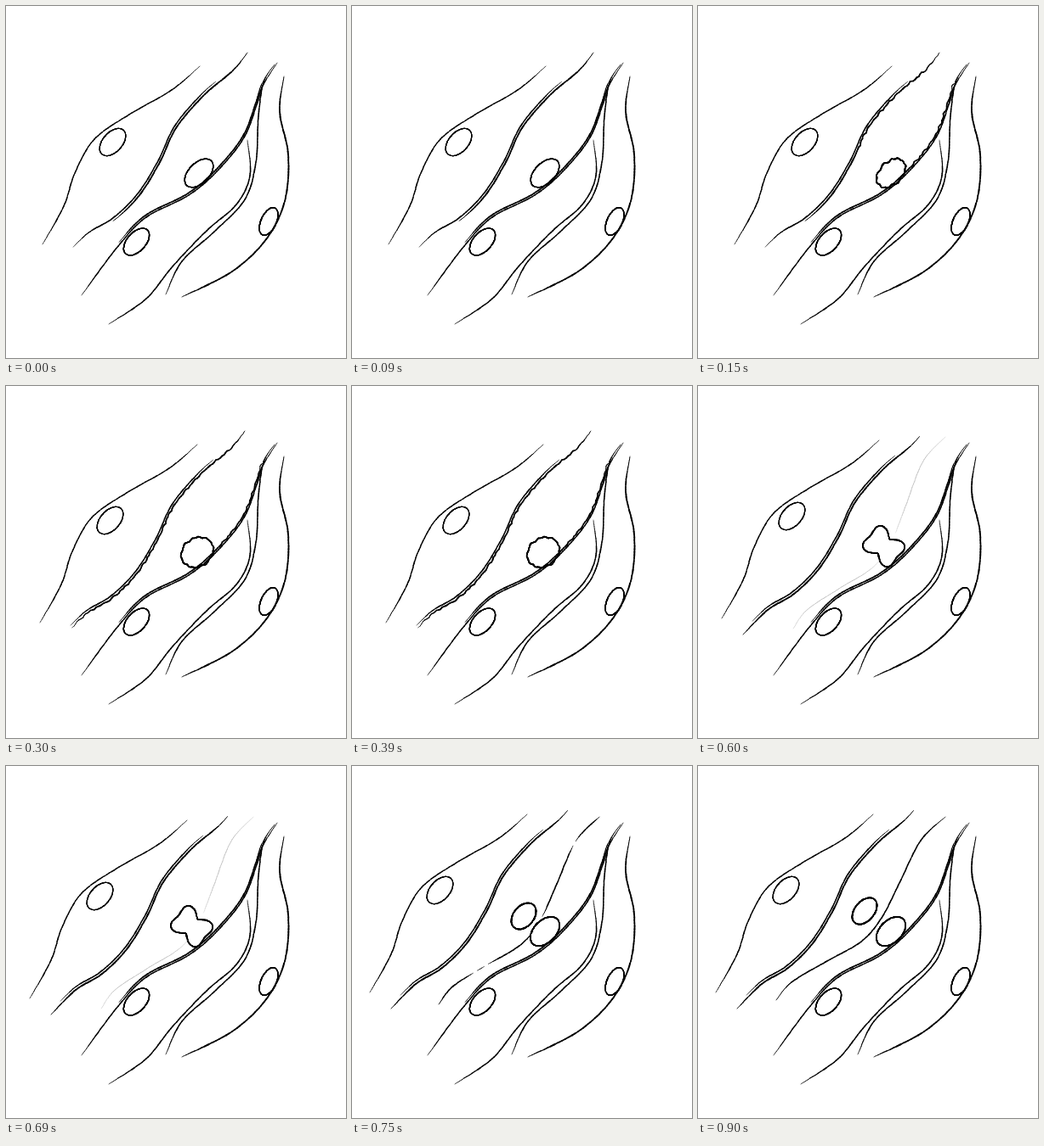
Animation of 400x415 px, one loop 1050 ms. Source, as an HTML page with a canvas:

```html
<!DOCTYPE html>
<html lang="en">
<head>
<meta charset="utf-8">
<title>Cell division</title>
<style>
  html, body { margin: 0; width: 100%; height: 100%; overflow: hidden; background: #fff; }
  canvas { display: block; }
</style>
</head>
<body>
<canvas id="stage" width="400" height="415"></canvas>
<script>
const STEP = 150;
const ctx = document.getElementById('stage').getContext('2d');
ctx.lineCap = 'round';

const { sin, cos, hypot, min, max, PI } = Math;
const grain = s => (sin(s * 1.13) + sin(s * 0.71 + 2) + sin(s * 0.29 + 4)) / 3;
const ripple = s => 0.7 * sin(s * 0.62 + 1.5 * sin(s * 0.13)) + 0.5 * sin(s * 0.37 + 1);
const shift = (points, dx, dy) => points.map(([x, y]) => [x + dx, y + dy]);
const path = text => text.split(' ').map(pair => pair.split(',').map(Number));

// Catmull-Rom curve through the points
function spline(points, closed) {
  const n = points.length, steps = 16, out = [];
  const at = i => points[closed ? (i + n) % n : max(0, min(n - 1, i))];
  const blend = (a, b, c, d, t) => {
    const cubic = 3 * (b - c) + d - a;
    const square = 2 * a - 5 * b + 4 * c - d;
    return b + 0.5 * t * (c - a + t * (square + t * cubic));
  };
  for (let i = 0; i < (closed ? n : n - 1); i++) {
    const [a, b, c, d] = [at(i - 1), at(i), at(i + 1), at(i + 2)];
    for (let k = 0; k < steps; k++) {
      out.push([0, 1].map(j => blend(a[j], b[j], c[j], d[j], k / steps)));
    }
  }
  out.push(at(closed ? 0 : n - 1));
  return out;
}

// Pencil stroke along the part from..to of a curve, thin at its ends.
// Above the height `below` its edge is ragged.
function brush(points, { width = 1.5, from = 0, to = 1, rough = 0, below = 415, closed = false, taper = 35, color = '#000' } = {}) {
  const line = spline(points, closed), last = line.length - 1;
  const length = [0];
  for (let i = 1; i <= last; i++) {
    length.push(length[i - 1] + hypot(line[i][0] - line[i - 1][0], line[i][1] - line[i - 1][1]));
  }
  const total = length[last], start = from * total, end = to * total;
  const edge = line.map(([x, y], i) => {
    const [x0, y0] = line[max(0, i - 1)], [x1, y1] = line[min(last, i + 1)];
    const size = hypot(x1 - x0, y1 - y0) || 1;
    const fade = min(1, length[i] / 5, (total - length[i]) / 5);
    const push = fade * ((y < below ? rough : 0) * ripple(length[i]) + 0.2 * grain(length[i] * 1.7));
    return [x - (y1 - y0) / size * push, y + (x1 - x0) / size * push];
  });
  ctx.strokeStyle = color;
  for (let i = 1; i <= last; i++) {
    const s = length[i];
    if (s < start || s > end) continue;
    const ends = closed ? 1 : min(1, (s - start) / taper, (end - s) / taper);
    ctx.lineWidth = width * (0.4 + 0.6 * ends) * (1 + 0.18 * grain(s));
    ctx.beginPath();
    ctx.moveTo(...edge[i - 1]);
    ctx.lineTo(...edge[i]);
    ctx.stroke();
  }
}

// Closed outline given by its radius at each angle from a tilted axis
function blob(x, y, tilt, radius, options) {
  const points = Array.from({ length: 24 }, (_, k) => {
    const angle = k * PI / 12, turned = angle + tilt * PI / 180, r = radius(angle);
    return [x + r * cos(turned), y + r * sin(turned)];
  });
  brush(points, { closed: true, width: 1.7, ...options });
}
const oval = (x, y, rx, ry, tilt, options) =>
  blob(x, y, tilt, a => rx * ry / hypot(ry * cos(a), rx * sin(a)), options);

const leftWall = path('43,281 68,236 81,197 104,157 145,128 195,99 228,71');
const upperWall = path('68,300 97,271 128,252 157,223 181,184 200,144 232,106 267,76 284,55');
const lowerWall = path('89,341 132,283 165,249 215,223 250,193 280,155 295,116 302,94 319,67');
const lowerEdge = path('121,375 165,345 196,307 236,265 271,234 287,200 284,158');
const rightInner = path('188,340 207,301 245,266 281,228 294,184 297,130 303,90 316,69');
const rightOuter = path('207,343 266,313 306,275 328,230 332,175 322,125 327,83');
const cleft = path('291,60 262,88 236,140 216,179 192,207 150,231 110,255 92,276');

// The new wall between the daughter cells; its lower end swings out by `spread`
function drawCleft(spread, parts, options) {
  const points = cleft.map(([x, y]) => [x + spread * (y - 60) / 215, y + spread / 2 * (y - 60) / 215]);
  parts.forEach(([from, to]) => brush(points, { from, to, ...options }));
}

function daughters(x, y, rx, ry) {
  oval(x, y, rx, ry, -50);
  oval(227, 195, 20.5, 13, -45);
}

// Each stage: drift of the left cell, raggedness, start of the upper wall, nucleus
const stages = [
  { drift: [0, 0], rough: 0, from: 0.23, nucleus: () => oval(227, 197, 20.5, 12, -45, { width: 1.4 }) },
  { drift: [0, 0], rough: 1, from: 0.23, below: 165, nucleus: () => oval(227, 197, 20, 13, -45, { rough: 1 }) },
  { drift: [-3, -2], rough: 0.7, from: 0.06, nucleus: () => oval(225, 196, 20, 16.5, -35, { rough: 0.8 }) },
  { drift: [-7, -4], rough: 0.3, from: 0.06, nucleus: () => blob(222, 191, -20, a => 20 + 1.6 * cos(4 * a), { rough: 0.5 }) },
  { drift: [-15, -7], rough: 0, from: 0, nucleus() {
    blob(218.5, 189, 40, a => 19.8 + 4.5 * cos(2 * a) - 4.3 * cos(4 * a));
    drawCleft(20, [[0, 0.44], [0.56, 1]], { width: 0.8, color: '#bbb' });
  } },
  { drift: [-22, -14], rough: 0, from: 0, nucleus() {
    daughters(202, 177, 17.5, 12);
    drawCleft(10, [[0, 0.14], [0.16, 0.46], [0.53, 0.75], [0.77, 0.8], [0.82, 1]], { taper: 15 });
  } },
  { drift: [-22, -14], rough: 0, from: 0, nucleus() {
    daughters(196, 171, 18, 11.5);
    drawCleft(0, [[0, 1]]);
  } }
];

function draw({ drift, rough, from, below, nucleus }) {
  ctx.fillStyle = '#fff';
  ctx.fillRect(0, 0, 400, 415);

  brush(lowerWall);
  brush(lowerEdge);
  brush(rightInner);
  brush(rightOuter, { width: 1.8 });
  oval(153.5, 278, 19, 11, -48, { width: 1.4 });
  oval(309, 254, 17.5, 9, -65, { width: 1.4 });

  brush(shift(leftWall, ...drift), { width: 1.4 });
  oval(125.5 + drift[0], 160.5 + drift[1], 19, 11.5, -48, { width: 1.2 });
  const upper = shift(upperWall, ...drift);
  brush(shift(upper, -1.5, -2.5), { from: 0.06, to: 0.85 });
  brush(upper, { width: 1.8, from, to: drift[0] < -10 ? 0.96 : 1, rough, below });

  brush(shift(lowerWall, -1, -2), { width: 1.7, from: 0.21, to: 0.94, rough, below: 192 });
  nucleus();
}

let shown;
function tick() {
  const stage = stages[Math.floor(performance.now() / STEP) % stages.length];
  if (stage !== shown) draw(shown = stage);
  requestAnimationFrame(tick);
}
tick();
</script>
</body>
</html>
```
